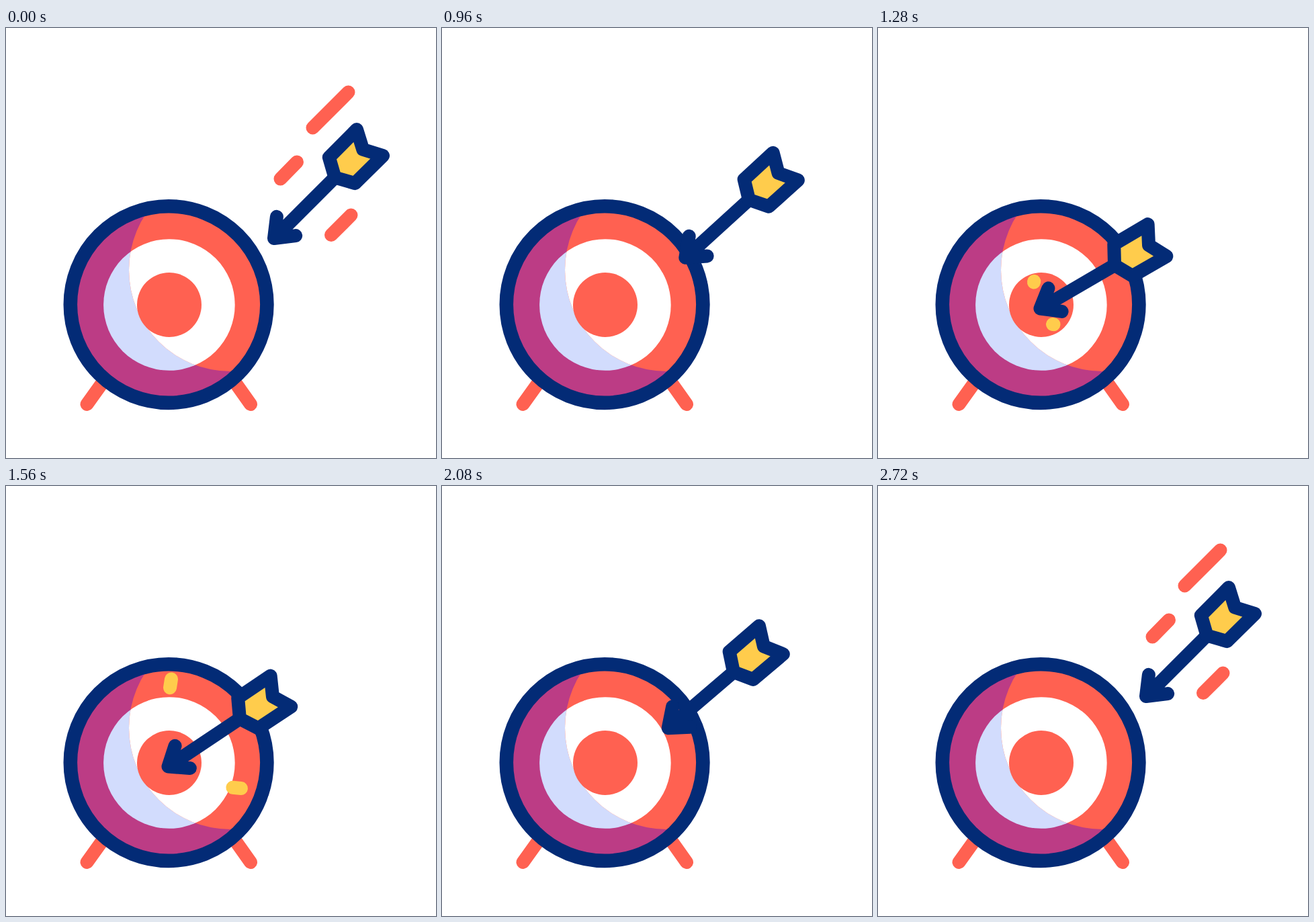
Animation of 640 by 640 pixels, one loop 2.76 s. Source, as an HTML page:

```html
<!DOCTYPE html>
<html lang="en">
<head>
<meta charset="utf-8">
<title>Arrow and target</title>
<style>
  html, body { margin: 0; height: 100%; overflow: hidden; background: #fff; }
  svg { display: block; width: 100vw; height: 100vh; }
  .line { fill: none; stroke-width: 20; stroke-linecap: round; stroke-linejoin: round; }
  .red { stroke: #ff6151; }
  .yellow { stroke: #ffcc4c; }
  .navy { stroke: #032b76; }
</style>
</head>
<body>
<svg viewBox="0 0 640 640">
  <clipPath id="lit"><circle cx="334" cy="360" r="151"/></clipPath>

  <path class="line red" d="M160 505L120.500 560M325 505L364 560"/>
  <g id="target">
    <circle cx="242.300" cy="411.700" r="140" fill="#bc3c85"/>
    <circle cx="242.900" cy="412" r="97.800" fill="#d2dcfd"/>
    <g clip-path="url(#lit)">
      <circle cx="242.300" cy="411.700" r="140" fill="#ff6151"/>
      <circle cx="242.900" cy="412" r="97.800" fill="#fff"/>
    </g>
    <circle cx="243" cy="412" r="48" fill="#ff6151"/>
    <circle class="navy" cx="242.100" cy="411.600" r="146.300" fill="none" stroke-width="20.600"/>
  </g>

  <g id="streaks"></g>

  <!-- The arrow lies on the x axis with its tip at the origin. -->
  <g id="arrow" class="line navy">
    <path d="M0 0H128M25.500 -20L0 0L25.500 20"/>
    <path fill="#ffcc4c" d="M128 0L143 -27.300L201.500 -27.600L187 0L201.500 27.600L143 27.300Z"/>
  </g>
</svg>

<script>
const LOOP = 2760, STEP = 40, IMPACT = 1220;
const arrow = document.getElementById("arrow");
const streaks = document.getElementById("streaks");

const progress = (t, start, end) => Math.min(1, Math.max(0, (t - start) / (end - start)));
const smooth = (t, start, end) => {
  const p = progress(t, start, end);
  return p * p * (3 - 2 * p);
};
const mix = (a, b, p) => a + (b - a) * p;

function streak(color, x1, y1, x2, y2) {
  const path = document.createElementNS("http://www.w3.org/2000/svg", "path");
  path.setAttribute("class", "line " + color);
  streaks.append(path);
  // Shows only the part of the line between two fractions of its length.
  return (from, to) => {
    const point = p => mix(x1, x2, p) + " " + mix(y1, y2, p);
    path.setAttribute("d", to > from ? `M${point(from)}L${point(to)}` : "");
  };
}

const speedLines = [
  streak("red", 456.5, 148.5, 509.5, 95.5),
  streak("red", 408.5, 224.5, 433, 199.5),
  streak("red", 484, 308, 513.5, 278.5)
];
const sparks = [
  streak("yellow", 232, 378.5, 246, 287.5),
  streak("yellow", 260, 441, 350, 450)
];

function placeArrow(t) {
  const p = t < 1500
    ? progress(t, 640, IMPACT) ** 2.35
    : (1 - progress(t, 1860, 2600)) ** 2.5;
  const bend = 4 * p * (1 - p);
  const x = mix(399, 241.5, p) + 3 * bend;
  const y = mix(313, 417.5, p) + 4 * bend;
  const since = t - IMPACT;
  const wobble = since > 0 && t < 1860
    ? 6.3 * Math.exp(-since / 130) * Math.sin(since / 260 * 2 * Math.PI)
    : 0;
  const angle = mix(45, 34.2, p) - wobble;
  arrow.setAttribute("transform", `translate(${x} ${y}) rotate(${-angle})`);
}

function draw(now) {
  const t = Math.floor(now % LOOP / STEP) * STEP;
  placeArrow(t);
  const shown = t < 1500 ? 1 - smooth(t, 640, 860) : smooth(t, 2400, 2700);
  speedLines.forEach(trim => trim(0, shown));
  sparks.forEach(trim => trim(smooth(t, 1300, 1640), smooth(t, 1260, 1520)));
  requestAnimationFrame(frame);
}

const start = performance.now();
function frame() {
  draw(performance.now() - start);
}
frame();
</script>
</body>
</html>
```
